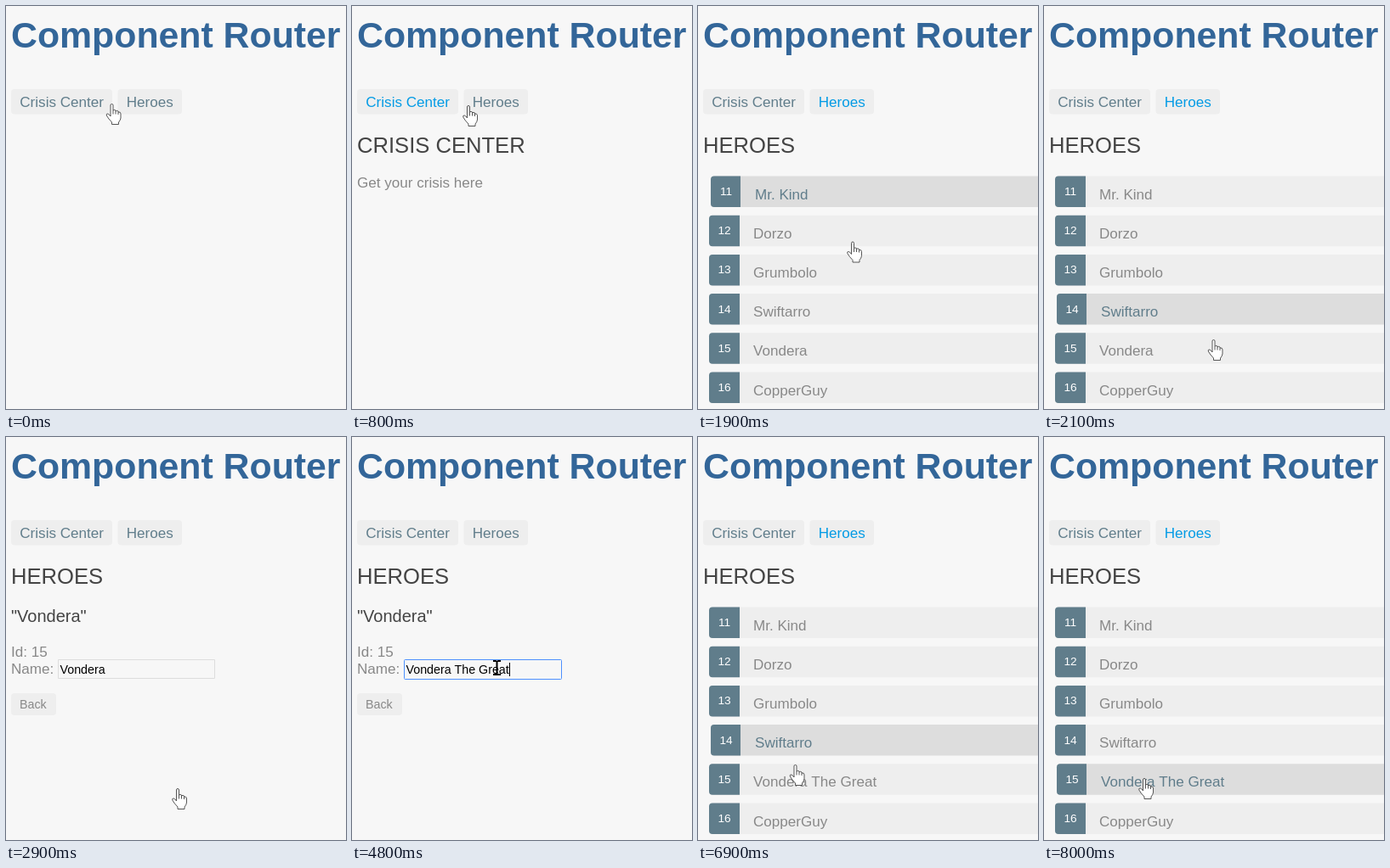
An HTML page with a canvas for the animation above (8.1 s loop, 400x475 px).

```html
<!DOCTYPE html>
<html lang="en">
<head>
<meta charset="utf-8">
<title>Component Router</title>
<style>
  html, body { margin: 0; width: 100%; height: 100%; overflow: hidden; background: #f7f7f7; }
  canvas { display: block; }
</style>
</head>
<body>
<canvas id="stage" width="400" height="475"></canvas>
<script>
const ctx = document.getElementById('stage').getContext('2d');
const LOOP = 8100, STEP = 100;
const SLATE = '#607d8b', BLUE = '#039be5', GREY = '#888', DARK = '#444';
const PALE = '#eee', HOVER = '#cfd8dc';
const LEFT = 6, BODY = 17.07, SMALL = 14.25, HEADING = 25.6;

const heroes = ['Mr. Kind', 'Dorzo', 'Grumbolo', 'Swiftarro', 'Vondera', 'CopperGuy'];
const EDITED = 4;
const LONG_NAME = heroes[EDITED] + ' The Great';

const crisisLink = { x: 6, y: 98, w: 119, h: 29.5 };
const heroesLink = { x: 131.5, y: 98, w: 75.5, h: 29.5 };
const backButton = { x: 6, y: 302, w: 53, h: 26 };
const rowBox = i => ({ x: 13, y: 200.5 + i * 46.2, w: 400, h: 36.5 });

// Pointer keyframes: time, hotspot x, hotspot y, cursor shape from that time on
const path = [
  [0, 124.5, 115, 'hand'], [100, 122, 115, 'hand'], [600, 122, 115, 'hand'],
  [1100, 159.5, 120, 'hand'], [1600, 159.5, 120, 'hand'], [1700, 164, 150, 'arrow'],
  [1800, 172, 205, 'hand'], [2000, 192, 350, 'hand'], [2100, 199.5, 393, 'hand'],
  [2300, 202, 414, 'hand'], [2900, 202, 414, 'hand'], [3000, 200, 402, 'arrow'],
  [3600, 172, 284, 'beam'], [3700, 170.5, 272, 'beam'], [4800, 170.5, 272, 'beam'],
  [5000, 142, 284, 'arrow'], [5600, 44, 316, 'hand'], [5700, 41, 323, 'hand'],
  [5900, 38, 324, 'hand'], [6400, 38, 324, 'hand'], [6900, 114.5, 386, 'hand'],
  [7300, 120, 398, 'hand'], [7400, 119, 398, 'hand'], [7500, 119, 398, 'hand'],
  [7600, 118, 399, 'hand'], [7700, 118, 399, 'hand'], [8000, 118, 402, 'hand']
];

function pointerAt(t) {
  let i = path.length - 1;
  while (path[i][0] > t) i--;
  const a = path[i], b = path[i + 1] || a;
  const k = b === a ? 0 : (t - a[0]) / (b[0] - a[0]);
  return { x: a[1] + (b[1] - a[1]) * k, y: a[2] + (b[2] - a[2]) * k, shape: a[3] };
}

function pageAt(t) {
  if (t < 500) return 'empty';
  if (t < 1400) return 'crisis';
  if (t >= 2900 && t < 6200) return 'detail';
  return 'list';
}

const inside = (p, b) =>
  p && p.x >= b.x && p.x <= b.x + b.w && p.y >= b.y && p.y <= b.y + b.h;

function text(str, x, y, size, color, style = '') {
  ctx.font = `${style} ${size}px "Liberation Sans", Arial, sans-serif`;
  ctx.fillStyle = color;
  ctx.fillText(str, x, y);
}

function box(b, color, radius = 4) {
  ctx.fillStyle = color;
  ctx.beginPath();
  ctx.roundRect(b.x, b.y, b.w, b.h, radius);
  ctx.fill();
}

function link(label, b, hovered, active) {
  box(b, hovered ? HOVER : PALE);
  text(label, b.x + 10.3, 118.5, BODY, hovered || active ? BLUE : SLATE);
}

function drawList(t, mouse) {
  text('HEROES', LEFT, 173, HEADING, DARK);
  heroes.forEach((name, i) => {
    const b = rowBox(i), hovered = inside(mouse, b);
    if (hovered) b.x += 2;
    box(b, hovered ? '#ddd' : PALE);
    box({ ...b, w: hovered ? 35 : 36 }, SLATE, [4, 0, 0, 4]);
    ctx.textAlign = 'center';
    text(11 + i, b.x + 18, b.y + 22.5, 13.7, '#fff');
    ctx.textAlign = 'left';
    const label = i === EDITED && t >= 6200 ? LONG_NAME : name;
    text(label, b.x + 52, b.y + 27, BODY, hovered ? SLATE : GREY);
  });
}

function drawDetail(t, mouse) {
  const name = heroes[EDITED];
  text('HEROES', LEFT, 173, HEADING, DARK);
  text(`"${t < 4900 ? name : LONG_NAME}"`, LEFT, 218, 20, DARK);
  text('Id: ' + (11 + EDITED), LEFT, 258.5, BODY, GREY);
  text('Name:', LEFT, 279, BODY, GREY);

  const focused = t >= 3800 && t < 5800;
  ctx.strokeStyle = focused ? '#4d90fe' : '#ddd';
  ctx.lineWidth = 1;
  ctx.beginPath();
  ctx.roundRect(61.5, 262.5, focused ? 185 : 184, focused ? 23 : 22, focused ? 1 : 0);
  ctx.stroke();
  const value = t < 4800 ? name : LONG_NAME;
  text(value, 63.5, 279, SMALL, '#000');
  const caretOn = Math.floor((t - 3800) / 500) % 2 === 0;
  if (focused && caretOn) {
    ctx.fillRect(Math.round(63.5 + ctx.measureText(value).width), 266, 1, 16);
  }

  box(backButton, inside(mouse, backButton) ? HOVER : PALE);
  text('Back', 16, 320, SMALL, GREY);
}

const handShape = new Path2D('M5.5 15V2Q5.5 .5 7 .5Q8.5 .5 8.5 2V8Q10 6.8 11.5 8V9' +
  'Q13 7.6 14.5 9V10Q17.5 9.5 17.5 12V17Q17 20 15 22V24.5H7V22Q3 18 .8 14' +
  'Q.2 11.8 2.3 12Q4 12.5 5.5 15Z');
const handLines = new Path2D('M8.5 8V12.5M11.5 9V12.5M14.5 10V13');
const arrowShape = new Path2D('M.5 .5V17L4.4 13.3L7 19.5L9.5 18.4L6.9 12.4H12.3Z');
const beamShape = new Path2D('M-4.5 -8H-1.5L0 -7L1.5 -8H4.5M0 -7V7M-4.5 8H-1.5L0 7L1.5 8H4.5');

function drawPointer(p) {
  ctx.save();
  ctx.translate(p.x - (p.shape === 'hand' ? 7 : 0), p.y);
  ctx.strokeStyle = p.shape === 'beam' ? '#000' : '#444';
  ctx.lineWidth = p.shape === 'beam' ? 2 : 0.9;
  ctx.fillStyle = '#fff';
  if (p.shape === 'beam') {
    ctx.stroke(beamShape);
  } else {
    const shape = p.shape === 'hand' ? handShape : arrowShape;
    ctx.fill(shape);
    ctx.stroke(shape);
    if (p.shape === 'hand') ctx.stroke(handLines);
  }
  ctx.restore();
}

function draw(t) {
  const page = pageAt(t);
  // Hover styles trail the pointer by one step
  const mouse = t >= STEP ? pointerAt(t - STEP) : null;
  ctx.fillStyle = '#f7f7f7';
  ctx.fillRect(0, 0, 400, 475);
  text('Component Router', LEFT, 49, 42.8, '#369', 'bold');
  link('Crisis Center', crisisLink, inside(mouse, crisisLink), page === 'crisis');
  link('Heroes', heroesLink, inside(mouse, heroesLink), page === 'list');

  if (page === 'crisis') {
    text('CRISIS CENTER', LEFT, 173, HEADING, DARK);
    text('Get your crisis here', LEFT, 214, BODY, GREY);
  } else if (page === 'list') {
    drawList(t, mouse);
  } else if (page === 'detail') {
    drawDetail(t, mouse);
  }
  drawPointer(pointerAt(t));
}

const start = performance.now();
function tick() {
  const t = (performance.now() - start) % LOOP;
  draw(Math.floor(t / STEP) * STEP);
  requestAnimationFrame(tick);
}
tick();
</script>
</body>
</html>
```
